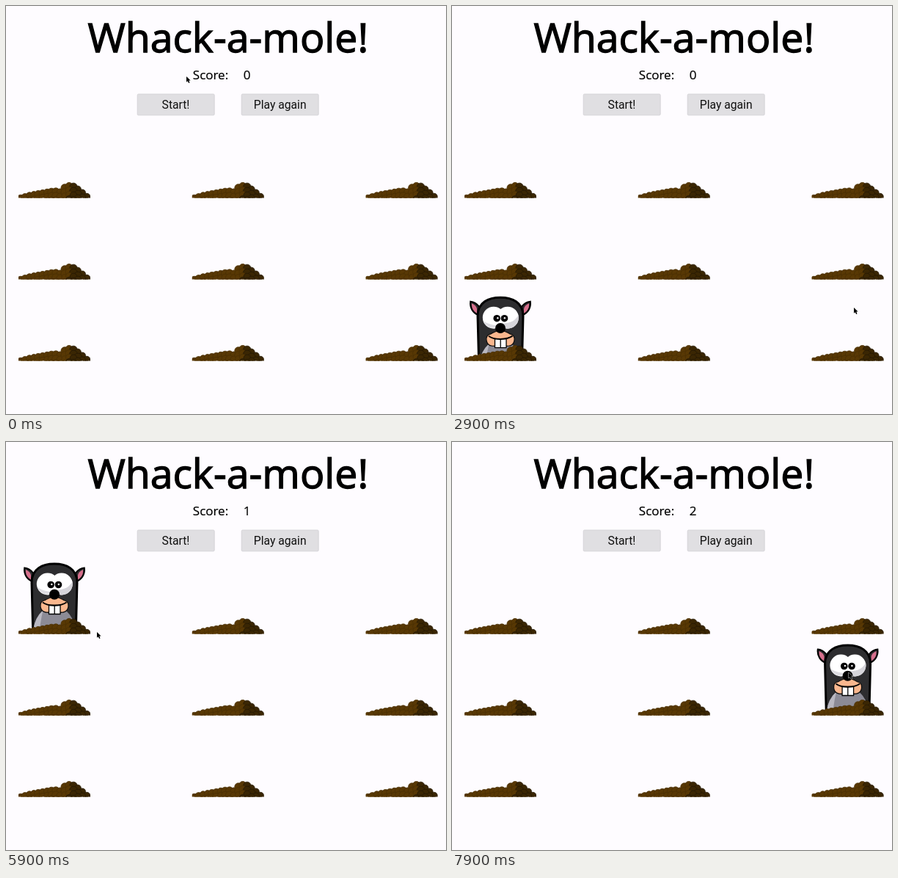
Write an HTML page that moves like this. It is 600 by 556 pixels and loops after 8000 ms.

```html
<!DOCTYPE html>
<html lang="en">
<head>
<meta charset="utf-8">
<title>Whack-a-mole!</title>
<style>
  html, body { margin: 0; height: 100%; overflow: hidden; background: #fefcff; }
  svg { display: block; }
  text { font-family: "Open Sans", "Noto Sans", sans-serif; stroke: #000; stroke-width: .2; }
  .button rect { fill: #e0dfe2; stroke: #d0cfd3; stroke-width: .8; }
  .button text { font: 15.7px Roboto, Inter, sans-serif; text-anchor: middle; stroke: none; fill: #111; }
</style>
</head>
<body>
<svg width="600" height="556" viewBox="0 0 600 556">
  <defs>
    <clipPath id="hole"><rect x="-60" y="-111" width="120" height="110"/></clipPath>
    <clipPath id="ground"><rect x="-49" y="-30" width="98" height="30"/></clipPath>
    <clipPath id="rightEye"><circle cx="9.8" cy="-68" r="15"/></clipPath>
    <clipPath id="belly"><ellipse cx="0" cy="0" rx="29" ry="38"/></clipPath>

    <g id="ear">
      <path d="M-40.8 -90C-36 -89.5 -32 -87 -29 -83L-30 -71.5C-37 -74 -42 -81 -40.8 -90Z" fill="#2b2b2d" stroke="#000" stroke-width="2"/>
      <path d="M-39 -87.5C-35 -86 -32.5 -83 -32 -80L-32 -74C-37 -77 -39.5 -81 -39 -87.5Z" fill="#d66f8c"/>
    </g>

    <g id="mole">
      <use href="#ear"/>
      <use href="#ear" transform="scale(-1 1)"/>
      <path d="M-29 8L-31 -70C-31 -89 -16 -95.5 0 -95.5S31 -89 31 -70L29 8Z" fill="#2d2d2f" stroke="#000" stroke-width="3"/>
      <g clip-path="url(#belly)">
        <rect x="-30" y="-40" width="60" height="50" fill="#8c8b96"/>
        <path d="M-30 10V-40H-13Q-20 -20 -21 10Z" fill="#b9b8c1"/>
      </g>
      <g fill="#fff">
        <circle cx="-9.2" cy="-68" r="15"/><circle cx="9.8" cy="-68" r="15"/>
      </g>
      <path d="M26 -76Q22 -60 2 -60L8 -50H28Z" fill="#d6d5da" clip-path="url(#rightEye)"/>
      <path d="M-23 -63Q-14 -58 -2 -57Q-8 -53 -14 -54.5Q-21 -58 -23 -63Z" fill="#dddce1"/>
      <g fill="#000">
        <circle cx="-4.8" cy="-67" r="4.8"/><circle cx="5.5" cy="-67" r="4.8"/>
      </g>
      <g fill="#fff">
        <circle cx="-3.7" cy="-67.5" r="1.2"/><circle cx="5.8" cy="-67.5" r="1.2"/>
      </g>
      <path d="M0 -50C-7 -51 -10 -47 -14 -45.5C-22 -43 -20 -31 -12 -29.5Q0 -28 12 -29.5C20 -31 22 -43 14 -45.5C10 -47 7 -51 0 -50Z" fill="#fab78e" stroke="#111" stroke-width="1.3"/>
      <path d="M-7.5 -39H8V-27H-7.5ZM.2 -39V-27" fill="#fff" stroke="#000" stroke-width="1.3"/>
      <path d="M-16 -43Q-11 -39 0 -38.8Q11 -39 16.5 -43" fill="none" stroke="#000" stroke-width="2"/>
      <circle cx="0" cy="-53.7" r="7"/>
    </g>

    <g id="mound" clip-path="url(#ground)"></g>
  </defs>

  <rect width="600" height="556" fill="#fefcff"/>
  <text x="302.8" y="62.8" font-size="55.4" text-anchor="middle" style="stroke-width:1.3">Whack-a-mole!</text>
  <text x="254.8" y="100" font-size="17">Score:</text>
  <text id="score" x="328.5" y="100" font-size="17" text-anchor="middle">0</text>
  <g class="button"><rect x="179.2" y="120" width="105" height="28.8" rx="1.5"/><text x="231.5" y="140">Start!</text></g>
  <g class="button"><rect x="321.2" y="120" width="105" height="28.8" rx="1.5"/><text x="373.7" y="140">Play again</text></g>
  <g id="field"></g>
  <path id="cursor" d="M0 0V7.8L1.8 6.2L3.1 9L4.5 8.4L3.3 5.6H5.6Z" stroke="#fff" stroke-width=".9" paint-order="stroke"/>
</svg>
<script>
const LOOP = 8000, RISE = 400, DEPTH = 111, STAY = 650, HIT_STAY = 1050;
const $ = id => document.getElementById(id);

// Interpolates [position, ...values] keys
function between(keys, at, shape = u => u) {
  const i = Math.max(1, keys.findIndex(key => key[0] > at));
  const [a, ...from] = keys[i - 1], [b, ...to] = keys[i];
  const u = shape((at - a) / (b - a));
  return from.map((v, n) => v + (to[n] - v) * u);
}

let seed = 7;
const random = () => (seed = seed * 16807 % 2147483647) / 2147483647;

// Clods of earth piled under a ridge line, upper rows behind lower ones
const ridge = [[-50, 3], [-33, 8], [0, 14], [11, 12], [15, 21], [25, 21], [34, 15], [50, 1]];
let clods = '';
for (let row = 0; row < 4; row++) {
  for (let x = -46; x < 49; x += 6) {
    const r = 4 + 1.5 * random(), y = r + 6 * row - between(ridge, x)[0];
    const dark = x > 25 - 2 * row;
    clods += `<circle cx="${x}" cy="${y}" r="${r}" fill="${dark ? '#3a2603' : '#583804'}"
      stroke="${dark ? '#251804' : '#4a2f04'}" stroke-width=".8"/>`;
  }
}
$('mound').innerHTML = clods;

const holes = Array.from({ length: 9 }, (_, i) => {
  const x = 66 + 236.8 * (i % 3), y = 261.5 + DEPTH * Math.floor(i / 3);
  $('field').insertAdjacentHTML('beforeend', `<g transform="translate(${x} ${y})">
    <g clip-path="url(#hole)"><use class="mole" href="#mole"/></g><use href="#mound"/></g>`);
  return $('field').lastElementChild.querySelector('.mole');
});

// Each mole goes down as the next comes up; the ones that get hit stay longer
const order = [6, 5, 7, 3, 6, 5, 8, 0, 8, 7, 5], hits = [6, 7];
let clock = 40;
const peeps = order.map((hole, i) => {
  const start = clock, hit = hits.includes(i);
  clock += hit ? HIT_STAY : STAY;
  return { hole, start, end: clock, hit };
});

// Pointer: time, x, y
const path = [
  [0, 246, 96], [450, 232, 117], [600, 232, 117], [1100, 530, 300], [1800, 200, 306], [2900, 548, 411],
  [4100, 539, 422], [4950, 541, 428], [5900, 124, 259], [6500, 542, 430], [7200, 312, 390],
  [7800, 298, 246], [7900, 541, 314], [LOOP, 541, 314]
];
const smooth = u => u * u * (3 - 2 * u);

// The CSS "ease" curve
function ease(x) {
  if (x <= 0) return 0;
  if (x >= 1) return 1;
  let lo = 0, hi = 1, s;
  for (let i = 0; i < 20; i++) {
    s = (lo + hi) / 2;
    if (.75 * s * (1 - s) + s ** 3 < x) lo = s; else hi = s;
  }
  return .3 * s * (1 - s) ** 2 + 3 * s * s * (1 - s) + s ** 3;
}

function draw(now) {
  const t = now % LOOP, up = Array(9).fill(0);
  for (const { hole, start, end } of peeps) up[hole] += ease((t - start) / RISE) - ease((t - end) / RISE);
  holes.forEach((mole, i) => mole.setAttribute('transform', `translate(0 ${DEPTH * (1 - up[i])})`));
  $('score').textContent = peeps.filter(peep => peep.hit && t >= peep.end).length;
  $('cursor').setAttribute('transform', `translate(${between(path, t, smooth)})`);
}

const begin = performance.now();
function tick() {
  draw(performance.now() - begin);
  requestAnimationFrame(tick);
}
tick();
</script>
</body>
</html>
```
